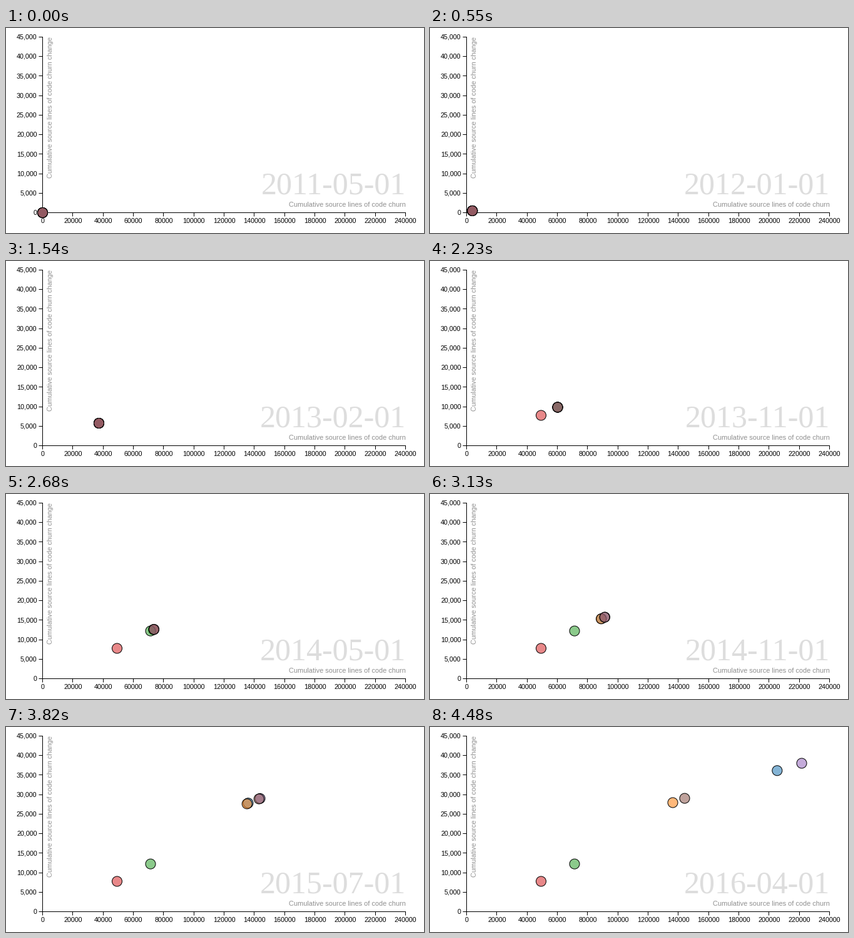
Recreate the animation shown at these times as a matplotlib script. Size 668 by 328 pixels, loop 6210 ms.

```python
import matplotlib.pyplot as plt
import numpy as np
from matplotlib.animation import FuncAnimation
from matplotlib.patches import Circle

W, H, DPI = 668, 328, 100
STEP, LOOP, END = 30, 6210, 4480
PX = 72 / DPI  # points per pixel
LEFT, RIGHT, TOP, BOTTOM = 58.5, 638.5, 14.5, 295.5
X_MAX, Y_MAX = 240000, 45000

# Key points of the leading bubble: ms, churn, change
TIMES, CHURN, CHANGE = zip(
    (60, 0, 0), (700, 4970, 640), (1120, 17590, 2640), (1540, 37240, 5765),
    (1960, 49240, 7770), (2230, 60200, 9850), (2590, 70140, 12010),
    (3130, 91450, 15770), (3720, 136350, 27945), (3820, 143800, 29000),
    (END, 221590, 38030))
SPLIT = 70140  # churn after which the bubbles keep their own pace

# Colour, pace after the split, churn where the bubble stops
BUBBLES = [
    ("#1f77b4", 0.893, 205450),
    ("#ff7f0e", 0.883, 136350),
    ("#2ca02c", 1, 71380),
    ("#d62728", 1, 49240),
    ("#9467bd", 1, 221590),
    ("#8c564b", 0.99, 144200),
]

fig = plt.figure(figsize=(W / DPI, H / DPI), dpi=DPI, facecolor="white")
ax = fig.add_axes([0, 0, 1, 1])
ax.set_xlim(0, W)
ax.set_ylim(H, 0)
ax.axis("off")


def to_x(churn):
    return LEFT + (RIGHT - LEFT) * churn / X_MAX


def to_y(change):
    return BOTTOM - (BOTTOM - TOP) * change / Y_MAX


def crisp(v):
    return np.floor(v) + 0.5


def line(xs, ys):
    ax.plot(xs, ys, color="black", lw=PX, solid_capstyle="butt",
            snap=False, zorder=1)


def label(x, y, text, size=10.7, color="black", ha="right",
          family="Liberation Sans", rotation=0):
    return ax.text(x, y, text, fontsize=size * PX, color=color, ha=ha,
                   va="baseline", family=family, rotation=rotation,
                   rotation_mode="anchor", zorder=2)


def draw_axes():
    line([LEFT, LEFT], [TOP - 0.5, BOTTOM + 0.5])
    line([LEFT - 0.5, RIGHT + 0.5], [BOTTOM, BOTTOM])
    for value in range(0, X_MAX + 1, 20000):
        x = to_x(value)
        line([crisp(x)] * 2, [BOTTOM, BOTTOM + 6])
        label(x, 312, str(value), ha="center")
    for value in range(0, Y_MAX + 1, 5000):
        y = to_y(value)
        line([LEFT - 6, LEFT], [crisp(y)] * 2)
        label(49.5, y + 3.2, f"{value:,}")


def position(t, pace, stop):
    churn = np.interp(t, TIMES, CHURN)
    churn = min(churn, SPLIT + pace * max(churn - SPLIT, 0), stop)
    return to_x(churn), to_y(np.interp(churn, CHURN, CHANGE))


def date_text(t):
    month = 4 + int(59 * min(t / END, 1) ** 0.945)
    return f"{2011 + month // 12}-{month % 12 + 1:02d}-01"


draw_axes()
caption = "Cumulative source lines of code churn"
label(RIGHT, 286, caption, 11, "#909090")
label(74, TOP, caption + " change", 11, "#909090", rotation=90)
date = label(RIGHT + 1, 266, "", 50, "#dddddd", family="Liberation Serif")
dots = [ax.add_patch(Circle((LEFT, BOTTOM), 8, facecolor=(color, 0.55),
                            edgecolor="black", lw=PX, zorder=3 + i))
        for i, (color, *_) in enumerate(BUBBLES)]


def update(frame):
    t = frame * STEP + 10
    date.set_text(date_text(t))
    for dot, (_, pace, stop) in zip(dots, BUBBLES):
        dot.center = position(t, pace, stop)
    return [date, *dots]


anim = FuncAnimation(fig, update, frames=LOOP // STEP, interval=STEP,
                     repeat=True, repeat_delay=0, blit=False)
plt.show()
```
